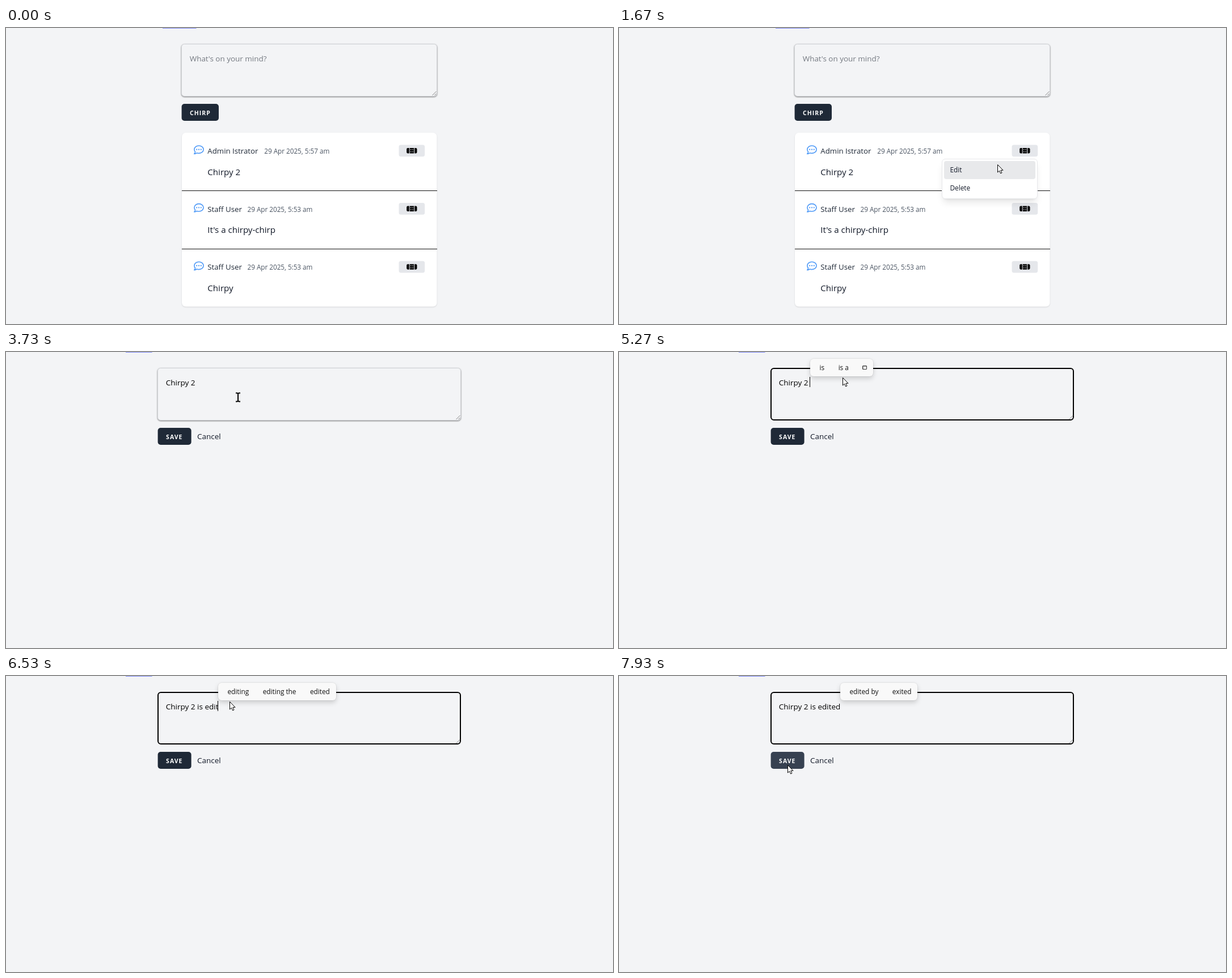
An HTML page that plays this animation: 1070x523 px, repeating every 8 s.

```html
<!DOCTYPE html>
<html lang="en">
<head>
<meta charset="utf-8">
<title>Chirps</title>
<style>
  html, body { margin: 0; width: 100%; height: 100%; overflow: hidden; background: #f3f4f6; }
  body { position: relative; font-family: "Open Sans", "Noto Sans", sans-serif; color: #111827; }
  svg { position: absolute; left: 0; top: 0; overflow: hidden; }
  text { white-space: pre; fill: #111827; }
  .field { fill: #f3f4f6; stroke: #d0d2d6; filter: drop-shadow(0 1px 1px rgba(0, 0, 0, .5)); }
  .field.focus { stroke: #000; stroke-width: 2; filter: none; transform: translate(.5px, .5px); width: 533px; height: 91px; }
  .card { fill: #fff; filter: drop-shadow(0 1px 1px rgba(0, 0, 0, .12)); }
  .label { font-weight: 700; letter-spacing: 1px; fill: #fff; }
  .more { fill: #e5e7eb; color: #000; }
  .more.hover { fill: #000; color: #fff; }
  .more path { fill: currentColor; }
  #menu { position: absolute; left: 569px; top: 230.5px; width: 169px; height: 71px; padding: 3px;
    box-sizing: border-box; background: #fff; border: 1px solid #e7e8ea; border-radius: 6px;
    box-shadow: 0 9px 13px -3px rgba(0, 0, 0, .1), 0 3px 5px -3px rgba(0, 0, 0, .1);
    font-size: 11.8px; line-height: 31.5px; transform-origin: 100% 0; }
  #menu div { padding-left: 10.5px; border-radius: 4px; }
  #menu .hover { background: #e8e9eb; }
  #popup { position: absolute; top: 12px; height: 31px; line-height: 33px; padding: 0 11px 0 16.5px;
    display: flex; gap: 24.5px; align-items: center; background: #f9f9f9; border-radius: 6px;
    box-shadow: 0 0 0 .5px rgba(0, 0, 0, .1), 0 4px 9px rgba(0, 0, 0, .17);
    font-size: 11.8px; color: #111; white-space: pre; }
  #popup i { width: 6px; height: 5px; border: 1px solid #333; border-radius: 1px;
    box-shadow: inset 1px 1px #aaa; }
</style>
</head>
<body>
<svg id="scene" width="1070" height="523"></svg>
<div id="menu"><div>Edit</div><div>Delete</div></div>
<div id="popup"></div>
<svg width="1070" height="523">
  <g id="arrow"><path d="M.5 .5V14L3.6 11.2 5.6 15.9 7.9 14.9 5.9 10.3H10Z" fill="#fff" stroke="#000"/></g>
  <g id="beam"><path d="M-4 -7.5H-1.5L0 -6.5 1.5 -7.5H4M0 -6.5V6.5M-4 7.5H-1.5L0 6.5 1.5 7.5H4"
    fill="none" stroke="#000" stroke-width="2"/></g>
</svg>
<script>
const LOOP = 8000;
const MESSAGE = 'Chirpy 2 is edited';
const TEXT_X = 281.8, TEXT_SIZE = 13.5;
const $ = id => document.getElementById(id);

// ---- static drawing ----
const text = (x, y, size, str, attrs = '') =>
  `<text x="${x}" y="${y}" font-size="${size}" ${attrs}>${str}</text>`;

const field = (x, w, attrs = '') =>
  `<rect class="field" ${attrs} x="${x}" y="28.5" width="${w}" height="92" rx="5"/>
   <path d="M${x + w - 8} 119L${x + w - 1} 112M${x + w - 4} 119L${x + w - 1} 116" stroke="#777" stroke-width=".9"/>`;

const button = (x, w, label, attrs = '') =>
  `<rect ${attrs} x="${x}" y="134" width="${w}" height="30" rx="5" fill="#1f2937"/>
   ${text(x + 14.5, 153.6, 10.5, label, 'class="label"')}`;

const tabLine = (x, w) => `<rect x="${x}" width="${w}" height="1" fill="#818cf8"/>`;

const bubble = `
  <g transform="translate(340 214.7)" fill="#4f9af7">
    <path d="M-6.4 4.2C-6.6 5.8 -7.4 6.9 -8.2 7.7C-6.3 7.7 -4.7 7 -3.5 6.1C-2.4 6.5 -1.2 6.7 0 6.7
      C4.6 6.7 8.1 3.7 8.1 0S4.6 -6.7 0 -6.7 -8.1 -3.7 -8.1 0C-8.1 1.6 -7.5 3 -6.4 4.2Z"
      fill="none" stroke="#4f9af7" stroke-width="1.6" stroke-linejoin="round"/>
    <circle cx="-3.8" r="1.15"/><circle r="1.15"/><circle cx="3.8" r="1.15"/>
  </g>`;

const moreButton = `
  <g class="more">
    <rect x="692.5" y="206.5" width="45.7" height="20.7" rx="3.6"/>
    <path d="M710.6 212V221.5H708.3Q706.2 221.5 706.2 219.4V214.1Q706.2 212 708.3 212Z
      M720.2 212V221.5H722.4Q724.5 221.5 724.5 219.4V214.1Q724.5 212 722.4 212Z M711.7 212H719.1V221.5H711.7Z"/>
    ${[[713.1, 214.2], [716.3, 214.2], [713.1, 217.9], [716.3, 217.9]]
      .map(([x, y]) => `<rect x="${x}" y="${y}" width="1.4" height="1.4"/>`).join('')}
  </g>`;

const chirp = ([name, dateX, time, body], i) => `
  <g transform="translate(0 ${i * 102.6})">
    ${bubble}
    ${text(355.3, 222, 13.25, name, 'style="fill:#1f2937"')}
    ${text(dateX, 222, 11.7, `29 Apr 2025, ${time} am`, 'style="fill:#4b5563"')}
    ${text(355.3, 259.8, 15.1, body)}
    ${moreButton}
  </g>
  ${i ? `<rect x="310" y="${184.4 + i * 102.7}" width="449.5" height="1" fill="#111" shape-rendering="crispEdges"/>` : ''}`;

const chirps = [
  ['Admin Istrator', 455.3, '5:57', 'Chirpy 2'],
  ['Staff User', 425.5, '5:53', "It's a chirpy-chirp"],
  ['Staff User', 425.5, '5:53', 'Chirpy']
];

$('scene').innerHTML = `
  <g id="listPage">
    ${tabLine(276, 59.5)}
    ${field(309.5, 450)}
    ${text(323.7, 59, 13.45, "What's on your mind?", 'style="fill:#757a82"')}
    ${button(309.6, 65.4, 'CHIRP')}
    <rect class="card" x="310" y="185" width="449.5" height="307.3" rx="7"/>
    ${chirps.map(chirp).join('')}
  </g>
  <g id="editPage">
    ${tabLine(211, 46.5)}
    ${field(267.5, 534, 'id="field"')}
    ${text(TEXT_X, 59, TEXT_SIZE, '', 'id="typed" style="fill:#000"')}
    <rect id="caret" y="44" width="1" height="18" fill="#000" shape-rendering="crispEdges"/>
    ${button(267.6, 59, 'SAVE', 'id="save"')}
    ${text(336.9, 153.8, TEXT_SIZE, 'Cancel')}
  </g>`;

// ---- timing tables ----
const pointer = [
  [70, 1054, 512], [200, 960, 432], [400, 800, 290], [530, 740, 241], [730, 716, 219],
  [1330, 716, 219], [1530, 700, 233], [1800, 636, 249], [2000, 616, 250],
  [3400, 616, 250], [3530, 545, 205], [3730, 409, 80], [3870, 396, 48], [3930, 396, 47],
  [4070, 394, 45], [7400, 394, 45], [7470, 392, 52], [7600, 360, 95], [7730, 318, 140],
  [7800, 305, 158], [7870, 300, 163], [7930, 297, 157]
];
const keys = [5070, 5330, 5530, 5600, 6000, 6270, 6330, 6530, 6870, 7000];
// time, opacity, scale
const menuSteps = [[0, 0, .9], [1200, .35, .91], [1270, .8, .975], [1330, 1, 1], [2400, .35, .97], [2470, 0, .9]];
// time, characters before the popup, suggestions
const popupSteps = [
  [0], [5270, 9, 'is|is a|#'], [5470, 10, 'is|is a|#'], [5600], [5800, 12, 'a|the|in'],
  [6000], [6130, 13, 'edited|editing|empty'], [6330], [6530, 16, 'editing|editing the|edited'],
  [6870], [7000, 17, 'edited|editor|exited'], [7200, 18, 'edited by|exited']
];

// ---- helpers ----
const between = (v, a, b) => v >= a && v < b;
const inBox = (p, x, y, w, h) => between(p.x, x, x + w) && between(p.y, y, y + h);
const stepAt = (steps, t) => steps.filter(s => s[0] <= t).pop();
const show = (el, on) => { el.style.display = on ? '' : 'none'; };

const pen = document.createElement('canvas').getContext('2d');
function caretX(count) {
  pen.font = `${TEXT_SIZE}px "Open Sans", "Noto Sans", sans-serif`;
  return Math.round(TEXT_X + pen.measureText(MESSAGE.slice(0, count)).width);
}

function pointerAt(t) {
  const n = pointer.findIndex(p => p[0] > t);
  const b = pointer[n < 0 ? pointer.length - 1 : n];
  const a = pointer[n < 0 ? pointer.length - 1 : Math.max(n - 1, 0)];
  const f = a === b ? 0 : (t - a[0]) / (b[0] - a[0]);
  return { x: Math.round(a[1] + (b[1] - a[1]) * f), y: Math.round(a[2] + (b[2] - a[2]) * f) };
}

const moreButtons = [...document.querySelectorAll('.more')];
const menuRows = [...$('menu').children];
let suggestions = '';

function render(t) {
  const editing = t >= 3130;
  const p = pointerAt(t);
  show($('listPage'), !editing);
  show($('editPage'), editing);

  moreButtons.forEach((b, i) =>
    b.classList.toggle('hover', !editing && t >= 70 && inBox(p, 692, 206 + i * 102.6, 46, 21)));

  const [, opacity, scale] = stepAt(menuSteps, t);
  show($('menu'), opacity > 0);
  $('menu').style.opacity = opacity;
  $('menu').style.transform = `scale(${scale})`;
  menuRows.forEach((row, i) => row.classList.toggle('hover', inBox(p, 573, 234 + i * 31.5, 161, 31.5)));

  const count = 8 + keys.filter(k => k <= t).length;
  $('typed').textContent = MESSAGE.slice(0, count);
  $('field').classList.toggle('focus', t >= 3930);
  $('caret').setAttribute('x', caretX(count) - 1);
  show($('caret'), between(t, 3930, 4470) || between(t, 5000, 7530));
  $('save').setAttribute('fill', inBox(p, 268, 134, 59, 30) ? '#374151' : '#1f2937');

  const [, anchor, words] = stepAt(popupSteps, t);
  show($('popup'), words);
  if (words) {
    $('popup').style.left = caretX(anchor) + 'px';
    if (words !== suggestions) {
      $('popup').innerHTML = words.split('|').map(w => w === '#' ? '<i></i>' : `<span>${w}</span>`).join('');
      suggestions = words;
    }
  }

  const visible = t >= 70 && !between(t, 4070, 5270);
  const beam = editing && inBox(p, 268, 28, 534, 93) && !between(t, 5270, 7470);
  show($('arrow'), visible && !beam);
  show($('beam'), visible && beam);
  for (const id of ['arrow', 'beam']) $(id).setAttribute('transform', `translate(${p.x} ${p.y})`);
}

// The picture changes 15 times a second, on times rounded to 10 ms.
const start = performance.now();
function tick() {
  const t = Math.max(0, performance.now() - start) % LOOP;
  const step = Math.floor((t + 4) * 15 / 1000);
  render(Math.round(step * 20 / 3) * 10);
  requestAnimationFrame(tick);
}
tick();
</script>
</body>
</html>
```
